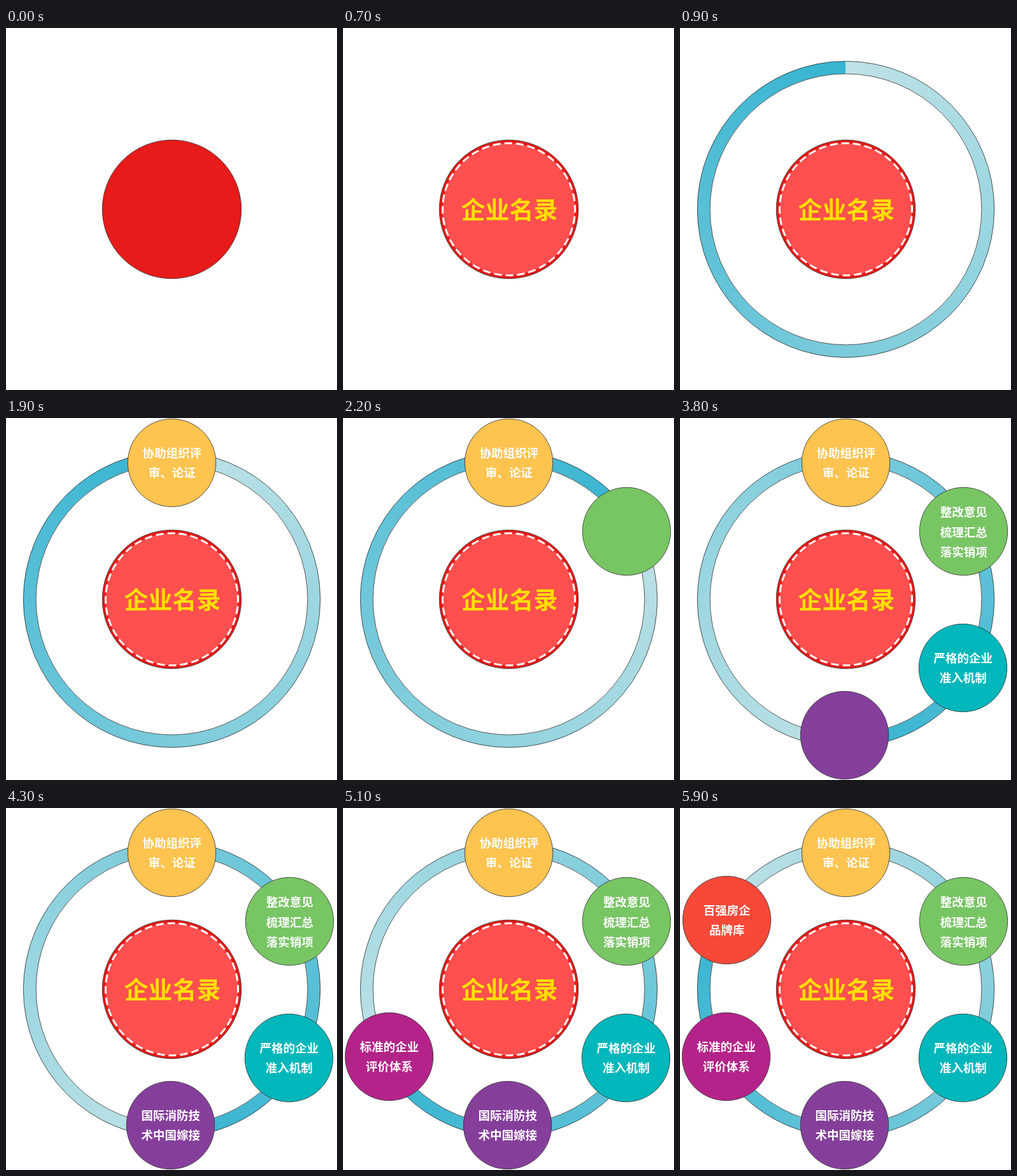
An HTML page for the animation above (8000 ms loop, 520 by 570 pixels).

```html
<!DOCTYPE html>
<html lang="zh-CN">
<head>
<meta charset="utf-8">
<title>企业名录</title>
<style>
  html, body { margin: 0; width: 100%; height: 100%; overflow: hidden; background: #fff; }
  #ring {
    --seam: 0deg;
    position: absolute; left: 27px; top: 52px; width: 467px; height: 467px;
    border-radius: 50%;
    background: conic-gradient(from var(--seam), #bfe2e6, #36b4d1);
    -webkit-mask: radial-gradient(circle, transparent 213px, #000 214px);
    mask: radial-gradient(circle, transparent 213px, #000 214px);
  }
  svg { position: absolute; left: 0; top: 0; }
  .edge { stroke: #2b2b2b; stroke-width: .8; }
  text {
    font-family: "Noto Sans CJK SC", "Noto Sans CJK", sans-serif;
    font-weight: 700; text-anchor: middle;
  }
  .label { font-size: 18.5px; fill: #fff; }
  .title { font-size: 38px; fill: #ffde00; }
</style>
</head>
<body>
<div id="ring" data-at="900"></div>
<svg id="stage" width="520" height="570" viewBox="0 0 520 570">
  <g data-at="900" fill="none">
    <circle class="edge" cx="260.5" cy="285.5" r="233.2"/>
    <circle class="edge" cx="260.5" cy="285.5" r="213.4"/>
  </g>
  <g transform="translate(260.5 285.5)">
    <circle class="edge" r="109.2" fill="#e61b1a"/>
    <g id="badge" data-at="100">
      <circle r="104" fill="#ff4f4f"/>
      <circle r="104" fill="none" stroke="#fff" stroke-width="3" pathLength="648"
        stroke-dasharray="12 6" stroke-dashoffset="6" transform="rotate(-90.5)"/>
      <text class="title" x="1" y="14.5">企业名录</text>
    </g>
  </g>
</svg>
<script>
  const LOOP = 8000;
  const topics = [
    { at: 1400, x: 260.5, y: 70.5, color: '#ffc34f', lines: ['协助组织评', '审、论证'] },
    { at: 2200, x: 445.5, y: 178.5, color: '#78c564', lines: ['整改意见', '梳理汇总', '落实销项'] },
    { at: 3000, x: 444.5, y: 393.5, color: '#00b7bb', lines: ['严格的企业', '准入机制'] },
    { at: 3800, x: 258.5, y: 499.5, color: '#853f9b', lines: ['国际消防技', '术中国嫁接'] },
    { at: 4600, x: 72.5, y: 391.5, color: '#b42389', lines: ['标准的企业', '评价体系'] },
    { at: 5400, x: 73.5, y: 176.5, color: '#f84838', lines: ['百强房企', '品牌库'] }
  ];
  const LINE = 31.3, TEXT_DELAY = 500;
  const stage = document.getElementById('stage');
  const ring = document.getElementById('ring');
  const badge = document.getElementById('badge');

  function add(parent, tag, attrs, text = '') {
    const node = document.createElementNS('http://www.w3.org/2000/svg', tag);
    for (const key in attrs) node.setAttribute(key, attrs[key]);
    node.textContent = text;
    return parent.appendChild(node);
  }

  for (const { at, x, y, color, lines } of topics) {
    add(stage, 'circle', { class: 'edge', cx: x, cy: y, r: 69.2, fill: color, 'data-at': at });
    const label = add(stage, 'g', { class: 'label', 'data-at': at + TEXT_DELAY });
    const first = y + 7 - (lines.length - 1) * LINE / 2 + (lines.length > 2 ? 1 : 0);
    lines.forEach((line, i) => add(label, 'text', { x: x + .3, y: first + i * LINE }, line));
  }

  const timed = [...document.querySelectorAll('[data-at]')];

  function draw(t) {
    for (const node of timed) node.style.visibility = t >= +node.dataset.at ? 'visible' : 'hidden';
    const scale = t < 300 ? .895 : t < 700 ? .948 : 1;
    badge.setAttribute('transform', `scale(${scale})`);
    // The seam of the ring hides behind the newest disc.
    const newest = Math.max(0, topics.filter(topic => t >= topic.at).length - 1);
    ring.style.setProperty('--seam', newest * 60 + 'deg');
  }

  const start = performance.now();
  function tick() {
    draw((performance.now() - start) % LOOP);
    requestAnimationFrame(tick);
  }
  tick();
</script>
</body>
</html>
```
